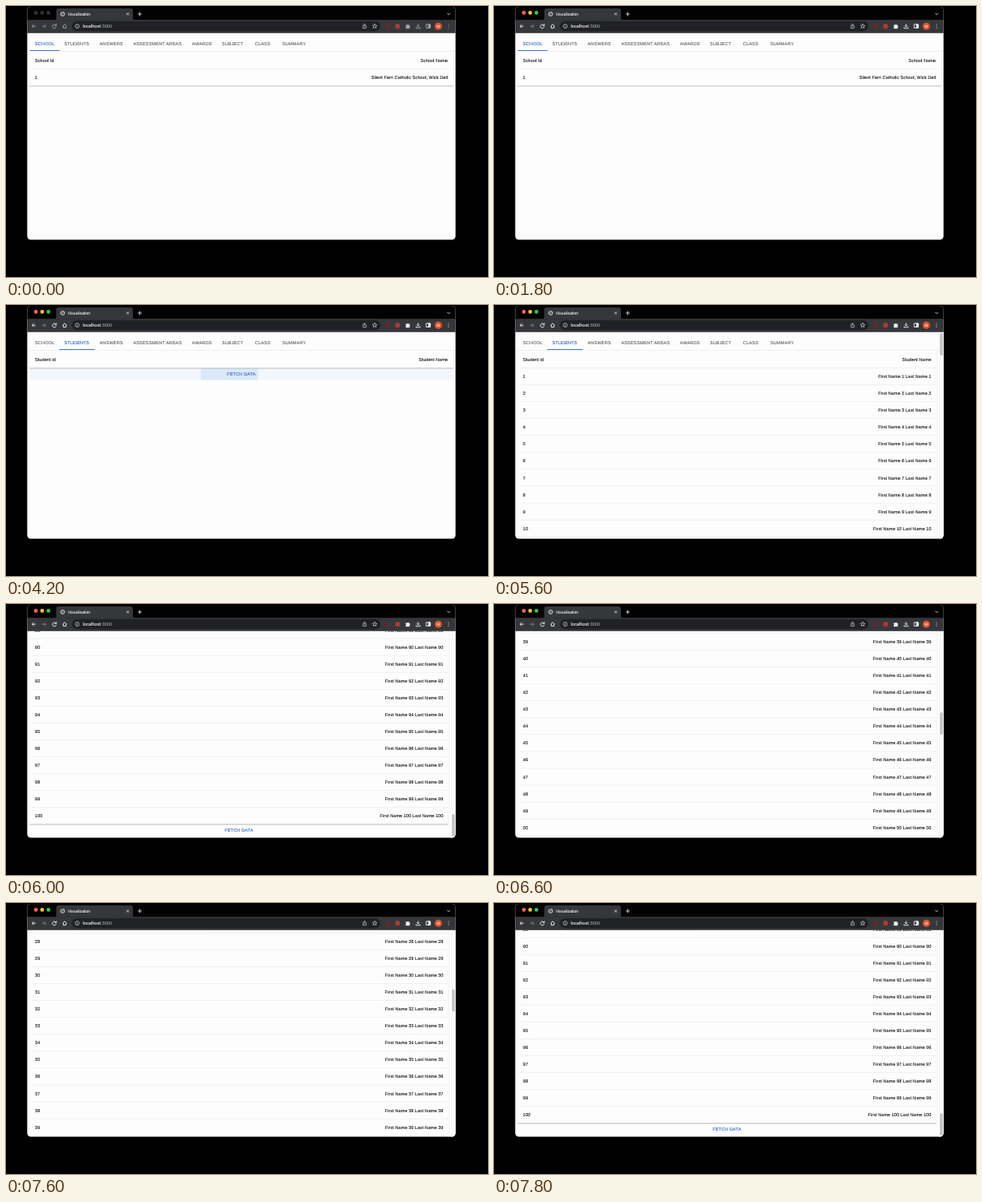
Animation of 600x338 px, one loop 8000 ms. Source, as an HTML page:

```html
<!DOCTYPE html>
<html lang="en">
<head>
<meta charset="utf-8">
<title>Visualization</title>
<style>
  html, body { margin: 0; width: 100%; height: 100%; overflow: hidden; background: #000; }
  svg { display: block; width: 600px; height: 338px; }
  text { font: 5.56px "Liberation Sans", Arial, sans-serif; fill: #111; stroke: #111; stroke-width: .1;
         letter-spacing: .0107em; text-rendering: geometricPrecision; white-space: pre; }
  .caps { letter-spacing: .02857em; fill: #5c5c5c; stroke: #5c5c5c; }
  .caps.on { fill: #2560c4; stroke: #2560c4; }
  .end { text-anchor: end; }
  .mid { text-anchor: middle; }
  .bar text { font-size: 5px; fill: #f1f3f4; stroke: #f1f3f4; letter-spacing: 0; }
  .bar .port { fill: #9aa0a6; stroke: #9aa0a6; }
  .icon { fill: none; stroke: currentColor; stroke-width: .9; }
</style>
</head>
<body>
<svg viewBox="0 0 600 338">
  <defs>
    <clipPath id="win"><rect x="26.400" y="1" width="533.200" height="290.600" rx="4.500"/></clipPath>
    <clipPath id="view"><rect x="26" y="33.800" width="534" height="259"/></clipPath>
    <clipPath id="tabBox"><rect x="66" y="37" width="44.500" height="19"/></clipPath>
    <clipPath id="button"><rect x="29.500" y="79.200" width="527" height="14.400"/></clipPath>
  </defs>
  <g clip-path="url(#win)">
    <rect x="26" y="1" width="534" height="291" fill="#fdfdfd"/>
    <g clip-path="url(#view)">
      <g id="page"></g>
      <g id="scrollbar">
        <rect x="554" y="33.800" width="6" height="259" fill="#fafafa"/>
        <path d="M554 33.800V292" stroke="#e8e8e8" stroke-width=".4"/>
        <rect id="thumb" x="555.200" y="35" width="3.400" height="28" rx="1.700" fill="#c1c1c1"/>
      </g>
    </g>
    <g class="bar">
      <rect x="26" y="1" width="534" height="17" fill="#020202"/>
      <path d="M60 17.600Q62.500 17.600 62.500 15V6Q62.500 3 65.500 3H155Q158 3 158 6V15Q158 17.600 160.500 17.600Z" fill="#36373a"/>
      <rect x="26" y="17.200" width="534" height="16.600" fill="#36373a"/>
      <rect x="82" y="19" width="384" height="12.400" rx="6.200" fill="#202124"/>
      <g id="lights"></g>
      <g class="icon" color="#d5d7da">
        <circle cx="70.500" cy="10" r="2.500"/>
        <path d="M68.500 9.200L70.500 10.200L70 12M71 7.800L71.500 9.200L73 9.600" stroke-width=".7"/>
        <path d="M150 8.500L153 11.500M153 8.500L150 11.500M164 10H169M166.500 7.500V12.500M549.300 9L551 10.800L552.700 9"/>
        <circle cx="88.700" cy="25.200" r="2.500" stroke-width=".7"/>
        <path d="M88.700 24.800V26.700M88.700 23.500V24.200" stroke-width=".7"/>
        <path d="M445 24.500H444.300V27.700H448.300V24.500H447.600M446.300 26V22.500M445 23.800L446.300 22.500L447.600 23.800" stroke-width=".7"/>
        <path d="M459 22.300L459.800 24.200L461.800 24.300L460.300 25.600L460.800 27.600L459 26.500L457.200 27.600L457.700 25.600L456.200 24.300L458.200 24.200Z" stroke-width=".7"/>
      </g>
      <path class="icon" color="#85878a" d="M44.700 25.200H49.300M47.300 23L49.500 25.200L47.300 27.400"/>
      <g id="tools" class="icon">
        <path d="M37 25.200H32.500M34.600 23L32.400 25.200L34.600 27.400"/>
        <path d="M62.200 24.200A2.400 2.400 0 1 0 62.500 26M62.700 22.400V24.600H60.500"/>
        <path d="M70.500 25.200L73 22.800L75.500 25.200M71.300 24.700V27.600H74.700V24.700"/>
        <path d="M497.800 23.800H499.200A1 1 0 0 1 501 23.800H502.200V25A1 1 0 0 1 502.200 26.700V27.900H497.800V26.500A.8 .8 0 0 0 497.800 25Z" fill="currentColor" stroke-width=".5"/>
        <path d="M513 22.300V26M511.300 24.500L513 26.200L514.700 24.500M510.400 26.500V27.800H515.600V26.500"/>
        <path d="M523 22.900H528V27.500H523Z"/><path d="M526 22.900H528V27.500H526Z" fill="currentColor"/>
        <path d="M550.900 22.500V23.400M550.900 24.700V25.600M550.900 26.900V27.800"/>
      </g>
      <circle cx="474.800" cy="25.200" r="2.800" fill="#6b252c"/>
      <rect x="484.600" y="22.500" width="5.600" height="5.600" rx="1" fill="#b03a35"/>
      <circle cx="538.200" cy="25.200" r="4.500" fill="#e6532b"/>
      <text class="mid" x="538.200" y="27" style="font-size:4.800px">M</text>
      <text x="77" y="11.800">Visualization</text>
      <text x="95.500" y="27.100" style="font-size:5.700px">localhost<tspan class="port">:3000</tspan></text>
    </g>
  </g>
</svg>
<script>
const LOOP = 8000, STEP = 200;
const PITCH = 21.05, MAX_SCROLL = 1909;
const FOCUS = 1800, CLICK_TAB = 3000, HOVER = 4000, LOADED = 4400;
const TABS = [["SCHOOL", 36], ["STUDENTS", 72.5], ["ANSWERS", 116.5], ["ASSESSMENT AREAS", 158.4],
  ["AWARDS", 231.6], ["SUBJECT", 268.8], ["CLASS", 310], ["SUMMARY", 344]];
// time, scroll offset
const SCROLL = [[0, 0], [5800, 24 * PITCH], [6000, MAX_SCROLL], [6600, 40 * PITCH], [6800, 0],
  [7600, 29 * PITCH - 1], [7800, MAX_SCROLL]];

const $ = id => document.getElementById(id);
const text = (x, y, s, cls = "") => `<text x="${x}" y="${y}" class="${cls}">${s}</text>`;
const rect = (x, y, w, h, fill, extra = "") =>
  `<rect x="${x}" y="${y}" width="${w}" height="${h}" fill="${fill}" ${extra}/>`;

function tabBar(t) {
  const active = t < CLICK_TAB ? 0 : 1;
  const slid = t >= CLICK_TAB + STEP;
  const arriving = slid && t < CLICK_TAB + 2 * STEP;
  let out = rect(29.5, 56, 527, .5, "#e2e2e2");
  if (t >= CLICK_TAB && t < CLICK_TAB + 2 * STEP)
    out += `<circle cx="86.5" cy="46.5" r="${slid ? 30 : 7}" fill="#2f69c9"
      fill-opacity="${slid ? .1 : .25}" clip-path="url(#tabBox)"/>`;
  TABS.forEach(([name, x], i) => out += text(x, 48.5, name, i === active ? "caps on" : "caps"));
  const x = arriving ? 64.5 : slid ? 66.2 : 29.8;
  return out + rect(x, 55, slid ? 44.2 : 36.8, 1, "#3f75cf");
}

function table(head, rows, right) {
  const bottom = 78.7 + rows.length * PITCH;
  let out = text(36, 69.7, head[0]) + text(right, 69.7, head[1], "end");
  rows.forEach(([id, name], i) => {
    const y = 91.2 + i * PITCH;
    out += rect(29.5, 78.4 + i * PITCH, right - 23, .5, "#e4e4e4")
      + text(36, y, id) + text(right, y, name, "end");
  });
  const edge = right + 6.4;
  return out + rect(29.3, 56, .4, bottom - 56, "#ececec") + rect(edge, 56, .4, bottom - 56, "#e4e4e4")
    + rect(29.5, bottom - .1, edge - 29.5, .7, "#929292")
    + rect(29.5, bottom + .6, edge - 29.5, .6, "#e6e6e6");
}

function fetchButton(t, x, y) {
  let out = "";
  if (t >= HOVER && t < LOADED) {
    const pressed = t >= HOVER + STEP;
    out += rect(29.5, 79.2, 527, 14.4, "#1976d2", `fill-opacity="${pressed ? .045 : .025}"`);
    if (pressed)
      out += `<circle cx="278.200" cy="86.400" r="36" fill="#1976d2" fill-opacity=".11" clip-path="url(#button)"/>`;
  }
  return out + text(x, y, "FETCH DATA", "caps on mid");
}

const students = Array.from({ length: 100 }, (_, i) =>
  [i + 1, `First Name ${i + 1} Last Name ${i + 1}`]);

function content(t) {
  if (t < CLICK_TAB)
    return table(["School Id", "School Name"], [[1, "Silent Fern Catholic School, Wick Dell"]], 550);
  const head = ["Student Id", "Student Name"];
  if (t < LOADED) return table(head, [], 550) + fetchButton(t, 293, 88.1);
  return table(head, students, 544.3) + fetchButton(t, 290, 88.1 + 100 * PITCH);
}

function draw(t) {
  const focused = t >= FOCUS;
  const colors = focused ? ["#fb5f57", "#fdbc2e", "#2bc840"] : Array(3).fill("#303133");
  $("lights").innerHTML = colors.map((c, i) =>
    `<circle cx="${37.2 + i * 7.8}" cy="8.500" r="2.400" fill="${c}"/>`).join("");
  $("tools").setAttribute("color", focused ? "#f1f3f4" : "#a3a5a8");

  const scroll = SCROLL.filter(k => k[0] <= t).pop()[1];
  $("page").innerHTML = tabBar(t) + content(t);
  $("page").setAttribute("transform", `translate(0 ${-scroll})`);
  $("scrollbar").setAttribute("visibility", t < LOADED ? "hidden" : "visible");
  $("thumb").setAttribute("y", 35 + 227 * scroll / MAX_SCROLL);
}

const start = performance.now();
let shown = -1;
function tick() {
  const t = Math.floor((performance.now() - start) % LOOP / STEP) * STEP;
  if (t !== shown) draw(shown = t);
  requestAnimationFrame(tick);
}
tick();
</script>
</body>
</html>
```
